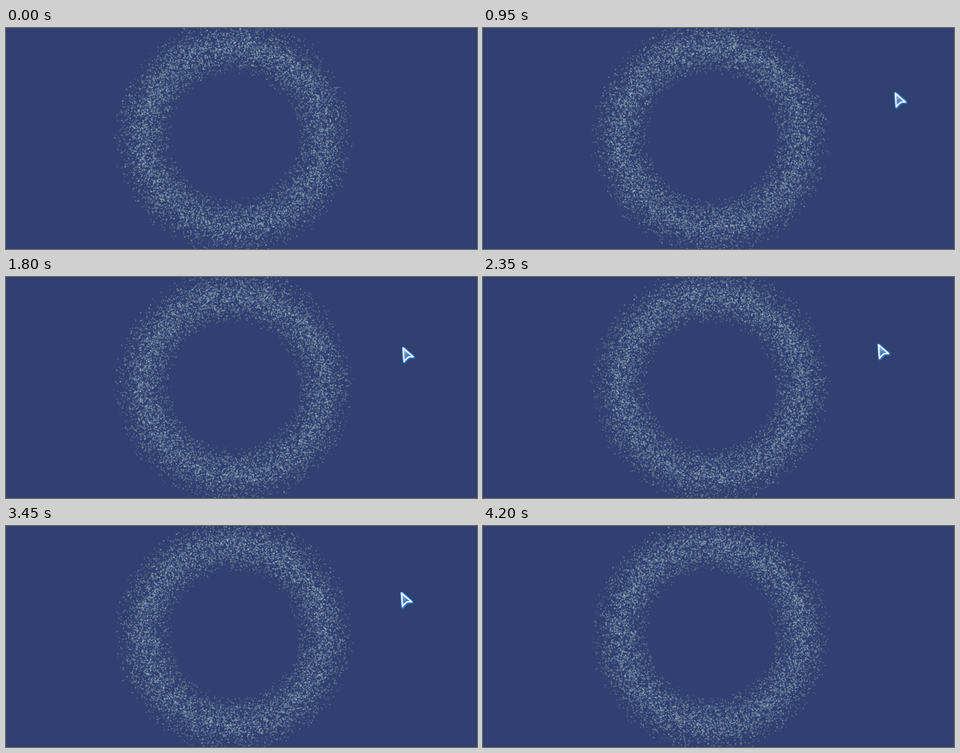
These frames come from a looping animation (589x277 px, 4.25 s). An HTML page with a canvas:

```html
<!DOCTYPE html>
<html lang="en">
<head>
<meta charset="utf-8">
<title>Dust ring</title>
<style>
  html, body { margin: 0; width: 100%; height: 100%; overflow: hidden; background: #304070; }
  canvas { display: block; }
  .cursor {
    position: absolute; left: 0; top: 0; width: 18px; height: 24px; overflow: visible;
    animation: glide 4250ms linear infinite, show 4250ms step-end infinite;
  }
  @keyframes show {
    0% { visibility: hidden; }
    1.17% { visibility: visible; }
    82.35%, 100% { visibility: hidden; }
  }
  @keyframes glide {
    0% { transform: translate(545px, 77px); animation-timing-function: step-end; }
    2.35% { transform: translate(523px, 77px); animation-timing-function: step-end; }
    3.52%, 20% { transform: translate(515px, 77px); animation-timing-function: ease-in-out; }
    29.4%, 32.9% { transform: translate(500px, 90px); animation-timing-function: ease-in-out; }
    41.2%, 45.9% { transform: translate(494px, 86px); animation-timing-function: ease-in-out; }
    55.3%, 72.9% { transform: translate(492px, 82px); animation-timing-function: step-end; }
    74%, 100% { transform: translate(492px, 81px); }
  }
</style>
</head>
<body>
<canvas width="589" height="277"></canvas>
<svg class="cursor" viewBox="0 0 18 24" stroke-linejoin="round">
  <defs>
    <linearGradient id="blue" x1="0" y1="0" x2=".4" y2="1">
      <stop offset=".2" stop-color="#9db4d2"/>
      <stop offset=".8" stop-color="#2b68b4"/>
    </linearGradient>
    <path id="arrow" d="M2.6 3 L15.2 14 Q10.5 13.2 8.4 15 Q6 17 3.8 20 Z"/>
  </defs>
  <use href="#arrow" x=".4" y=".4" fill="none" stroke="#2383e0" stroke-opacity=".75" stroke-width="4.4"/>
  <use href="#arrow" fill="url(#blue)" stroke="#f0f7ff" stroke-width="1.9"/>
</svg>
<script>
  const LOOP = 4250, STEP = 50, HOLD = 250;
  const COUNT = 9000, CX = 284.5, CY = 135, RADIUS = 114.5, SPREAD = 37;
  const COLORS = ['#9ab4be', '#98b8ba', '#a6bcbc', '#8fb0c4', '#adbfbe', '#9cc0c6'];
  const ctx = document.querySelector('canvas').getContext('2d');

  let seed = 20731;
  function rand() {
    seed = (seed + 0x6D2B79F5) | 0;
    let n = Math.imul(seed ^ (seed >>> 15), 1 | seed);
    n = (n + Math.imul(n ^ (n >>> 7), 61 | n)) ^ n;
    return ((n ^ (n >>> 14)) >>> 0) / 4294967296;
  }

  function makeDot(_, i) {
    // Peaked in the middle of the band, never beyond -1 to 1
    const offset = rand() + rand() - 1;
    const glow = rand() < 0.015 ? 0.9 : 0.3 + rand() * 0.3;
    return {
      color: COLORS[Math.floor(i * COLORS.length / COUNT)],
      angle: rand() * Math.PI * 2,
      radius: RADIUS + offset * SPREAD,
      spin: 0.06 + rand() * 0.14,
      phase: rand() * Math.PI * 2,
      size: 1.1 + rand() * 0.6,
      alpha: glow * (1 - 0.35 * Math.abs(offset))
    };
  }
  const dots = Array.from({ length: COUNT }, makeDot);

  function draw(time) {
    const s = Math.max(0, time - HOLD) / 1000;
    ctx.globalAlpha = 1;
    ctx.fillStyle = '#304070';
    ctx.fillRect(0, 0, 589, 277);
    let color;
    for (const d of dots) {
      if (d.color !== color) ctx.fillStyle = color = d.color;
      const a = d.angle + d.spin * s;
      const r = d.radius + Math.sin(d.phase + s * 1.5) * 0.8;
      ctx.globalAlpha = d.alpha;
      ctx.fillRect(CX + Math.cos(a) * r, CY + Math.sin(a) * r, d.size, d.size);
    }
  }

  let start, last;
  function tick(now) {
    start ??= now;
    const time = Math.floor(((now - start) % LOOP) / STEP) * STEP;
    if (time !== last) draw(last = time);
    requestAnimationFrame(tick);
  }
  requestAnimationFrame(tick);
</script>
</body>
</html>
```
